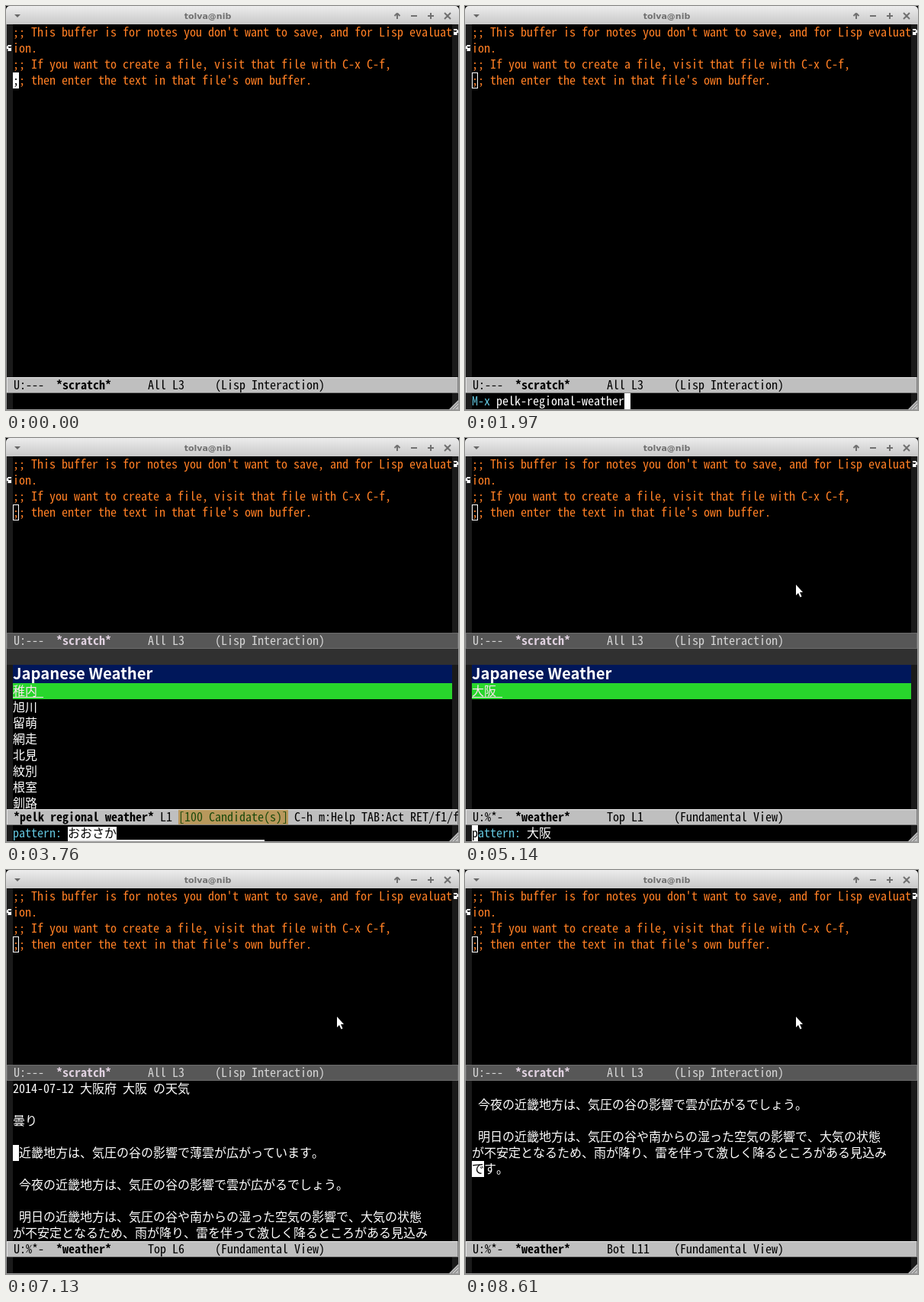
These frames come from a looping animation (594x529 px, 9.81 s). An HTML page with a canvas:

```html
<!DOCTYPE html>
<html lang="en">
<head>
<meta charset="utf-8">
<title>Weather lookup in an editor</title>
<style>
html, body { margin: 0; width: 100%; height: 100%; overflow: hidden; background: #000; }
canvas { display: block; }
</style>
</head>
<body>
<canvas id="stage" width="594" height="529"></canvas>
<script>
const ctx = document.getElementById('stage').getContext('2d');
const LOOP = 9810, LEFT = 9, RIGHT = 585, CELL = 8, ROW = 21;
const TOP = 24, SPLIT = 255, LOWER = 276, STATUS = 486, MINI = 507;
const MONO = '16px "Noto Sans Mono CJK JP", "Noto Sans CJK JP", "Noto Sans Mono", monospace';
const HEADING = 'bold 20.3px "Noto Sans CJK JP", "Noto Sans", sans-serif';

const NOTES = [
  ";; This buffer is for notes you don't want to save, and for Lisp evaluat",
  'ion.',
  ';; If you want to create a file, visit that file with C-x C-f,',
  ";; then enter the text in that file's own buffer."
];
const COMMAND = 'pelk-regional-weather';
const CITIES = ['稚内', '旭川', '留萌', '網走', '北見', '紋別', '根室', '釧路'];
const REPORT = [
  '2014-07-12 大阪府 大阪 の天気', '', '曇り', '',
  ' 近畿地方は、気圧の谷の影響で薄雲が広がっています。', '',
  ' 今夜の近畿地方は、気圧の谷の影響で雲が広がるでしょう。', '',
  ' 明日の近畿地方は、気圧の谷や南からの湿った空気の影響で、大気の状態',
  'が不安定となるため、雨が降り、雷を伴って激しく降るところがある見込み',
  'です。'
];

const KEY_TIMES = [660, 790, 950, 1090, 1370, 1630, 1680];
const COMPOSING = [
  [3130, 'お'], [3310, 'おお'], [3470, 'おおs'], [3550, 'おおさ'],
  [3680, 'おおさk'], [3720, 'おおさか'], [3900, '大阪']
];
// The status line updates first, the cursor may follow one tick later.
const LINE_TIMES = [6180, 6420, 6690, 6900, 7130, 7430, 7770, 7990, 8270, 8570];
const CURSOR_TIMES = [6220, 6420, 6690, 6940, 7170, 7470, 7770, 7990, 8310, 8610];

const passed = (times, t) => times.filter(time => time <= t).length;
const isWide = ch => ch > '\u2fff';
const textWidth = s => [...s].reduce((sum, ch) => sum + (isWide(ch) ? 2 : 1) * CELL, 0);

function rect(x, y, w, h, color) {
  ctx.fillStyle = color;
  ctx.fillRect(x, y, w, h);
}

function text(s, x, top, color, bold) {
  ctx.font = (bold ? 'bold ' : '') + MONO;
  ctx.fillStyle = color;
  ctx.fillText(s, x, top + 16);
}

function shape(points, color) {
  ctx.fillStyle = color;
  ctx.beginPath();
  points.forEach(([x, y]) => ctx.lineTo(x, y));
  ctx.closePath();
  ctx.fill();
}

function line(color, width, ...segments) {
  ctx.strokeStyle = color;
  ctx.lineWidth = width;
  ctx.beginPath();
  for (const [x1, y1, x2, y2] of segments) {
    ctx.moveTo(x1, y1);
    ctx.lineTo(x2, y2);
  }
  ctx.stroke();
}

function cursor(x, top, ch = ' ') {
  rect(x, top, textWidth(ch), ROW, '#fff');
  text(ch, x, top, '#000');
}

function titleBar() {
  const shade = ctx.createLinearGradient(0, 0, 0, TOP);
  shade.addColorStop(0, '#ececec');
  shade.addColorStop(1, '#c8c8c8');
  ctx.fillStyle = shade;
  ctx.beginPath();
  ctx.roundRect(0, 0, 594, TOP, [5, 5, 0, 0]);
  ctx.fill();
  ctx.font = 'bold 11px "DejaVu Sans", sans-serif';
  ctx.textAlign = 'center';
  ctx.fillStyle = '#707070';
  ctx.fillText('tolva@nib', 264.5, 17);
  ctx.textAlign = 'left';
  shape([[11, 11], [19, 11], [15, 15]], '#666');
  line('#707070', 2,
    [513, 10, 513, 17], [509.5, 13, 513, 9.5], [516.5, 13, 513, 9.5],
    [531, 13, 539, 13],
    [553, 13, 561, 13], [557, 9, 557, 17],
    [575, 9, 583, 17], [583, 9, 575, 17]);
}

function wrapArrow(x, y, flip) {
  ctx.save();
  ctx.translate(x, y);
  ctx.scale(flip, 1);
  shape([
    [-2, -4], [2, -4], [4, -2], [4, 1], [2, 2], [3, 4], [-2, 4],
    [-2, -1], [-1, 0], [1, 0], [2, -1], [2, -2], [-2, -2]
  ], '#fff');
  ctx.restore();
}

function statusBar(top, active) {
  const light = active ? '#e8e8e8' : '#6c6c6c';
  const dark = active ? '#7f7f7f' : '#6c6c6c';
  rect(1, top, 592, ROW, dark);
  rect(1, top, 591, ROW - 1, light);
  rect(2, top + 1, 590, ROW - 2, active ? '#bfbfbf' : '#575757');
}

function bufferStatus(top, active, flags, name, place, mode) {
  const color = active ? '#000' : '#d5d5d5';
  statusBar(top, active);
  text(flags, 10, top, color);
  text(name, 66, top, active ? '#000' : '#e0d2e0', true);
  text(place.padEnd(11) + mode, 186, top, color);
}

function weatherStatus(lineNo) {
  const place = (lineNo > 10 ? 'Bot L' : 'Top L') + lineNo;
  bufferStatus(STATUS, true, 'U:%*-', '*weather*', place, '(Fundamental View)');
}

function pickerStatus(total) {
  const badge = `[${total} Candidate(s)]`;
  const end = 226 + textWidth(badge);
  statusBar(STATUS, true);
  text('*pelk regional weather*', 10, STATUS, '#000', true);
  text('L1', 202, STATUS, '#000');
  rect(226, STATUS + 1, end - 226, ROW - 2, '#b8985c');
  text(badge, 226, STATUS, '#1c4a0c');
  text('C-h m:Help TAB:Act RET/f1/f2', end + CELL, STATUS, '#000');
}

function notes(focused) {
  NOTES.forEach((s, i) => text(s, LEFT, TOP + i * ROW, '#ff7f24'));
  wrapArrow(589, 34, 1);
  wrapArrow(5, 55, -1);
  if (focused) return cursor(LEFT, 87, ';');
  ctx.strokeStyle = '#fff';
  ctx.lineWidth = 1;
  ctx.strokeRect(LEFT + .5, 87.5, 7, 20);
}

function picker(cities) {
  rect(1, LOWER, 592, ROW, '#303030');
  rect(LEFT, 297, RIGHT - LEFT, 24, '#00175a');
  ctx.font = HEADING;
  ctx.fillStyle = '#fff';
  ctx.fillText('Japanese Weather', LEFT, 316);
  rect(LEFT, 321, RIGHT - LEFT, ROW, '#28d62c');
  cities.forEach((s, i) => text(s, LEFT, 321 + i * ROW, i ? '#fff' : '#ffe4f0'));
  rect(LEFT, 339, 40, 1, '#ffe4f0');
}

function report(t) {
  const row = passed(CURSOR_TIMES, t);
  const first = row > 9 ? 5 : 0;
  REPORT.slice(first, first + 10).forEach((s, i) => text(s, LEFT, LOWER + i * ROW, '#fff'));
  cursor(LEFT, LOWER + (row - first) * ROW, REPORT[row][0]);
}

function commandPrompt(t) {
  text('M-x', LEFT, MINI, '#62c4dc');
  if (t < 480) return;
  const typed = COMMAND.slice(0, t < 1970 ? passed(KEY_TIMES, t) : COMMAND.length);
  text(typed, 41, MINI, '#fff');
  cursor(41 + textWidth(typed), MINI);
}

function patternPrompt(t) {
  text('pattern:', LEFT, MINI, '#62c4dc');
  const step = passed(COMPOSING.map(([time]) => time), t);
  const typed = step ? COMPOSING[step - 1][1] : '';
  const width = textWidth(typed);
  if (!step || t >= 4030) {
    text(typed, 81, MINI, '#fff');
    if (t < 5100) cursor(81 + width, MINI);
    else cursor(LEFT, MINI, 'p');
    return;
  }
  rect(81, 509, width, 17, '#fff');
  text(typed, 81, MINI, '#000');
  if (t >= 3170) rect(81, 526, t < 3590 ? 363 : 258, 2, '#e8e8e8');
}

function lowerWindow(t) {
  if (t >= 5180) report(t);
  else if (t >= 2600) picker(t < 4110 ? CITIES : ['大阪']);
  if (t >= 5140) weatherStatus(1 + passed(LINE_TIMES, t));
  else pickerStatus(t < 4110 ? 100 : 1);
}

function frame() {
  rect(0, TOP, 1, 505, '#999');
  rect(593, TOP, 1, 505, '#999');
  rect(0, 528, 594, 1, '#999');
  shape([[593, 516], [593, 528], [581, 528]], '#bdbdbd');
  line('#777', 1, [584, 528, 593, 519], [588, 528, 593, 523]);
}

function pointer() {
  shape([[434, 192], [434, 206], [437, 203], [439.5, 208.5], [441.5, 207.5], [439, 202], [443, 202]], '#fff');
}

function draw(t) {
  const split = t >= 2560;
  rect(0, 0, 594, 529, '#000');
  rect(1, TOP, 8, 504, '#1a1a1a');
  rect(RIGHT, TOP, 8, 504, '#1a1a1a');
  titleBar();
  notes(t < 440);
  bufferStatus(split ? SPLIT : STATUS, !split, 'U:---', '*scratch*', 'All L3', '(Lisp Interaction)');
  if (split) lowerWindow(t);
  if (t >= 440 && t < 2400) commandPrompt(t);
  if (t >= 2600 && t < 5180) patternPrompt(t);
  frame();
  if (t >= 4980) pointer();
}

function tick() {
  draw(performance.now() % LOOP);
  requestAnimationFrame(tick);
}
tick();
</script>
</body>
</html>
```
